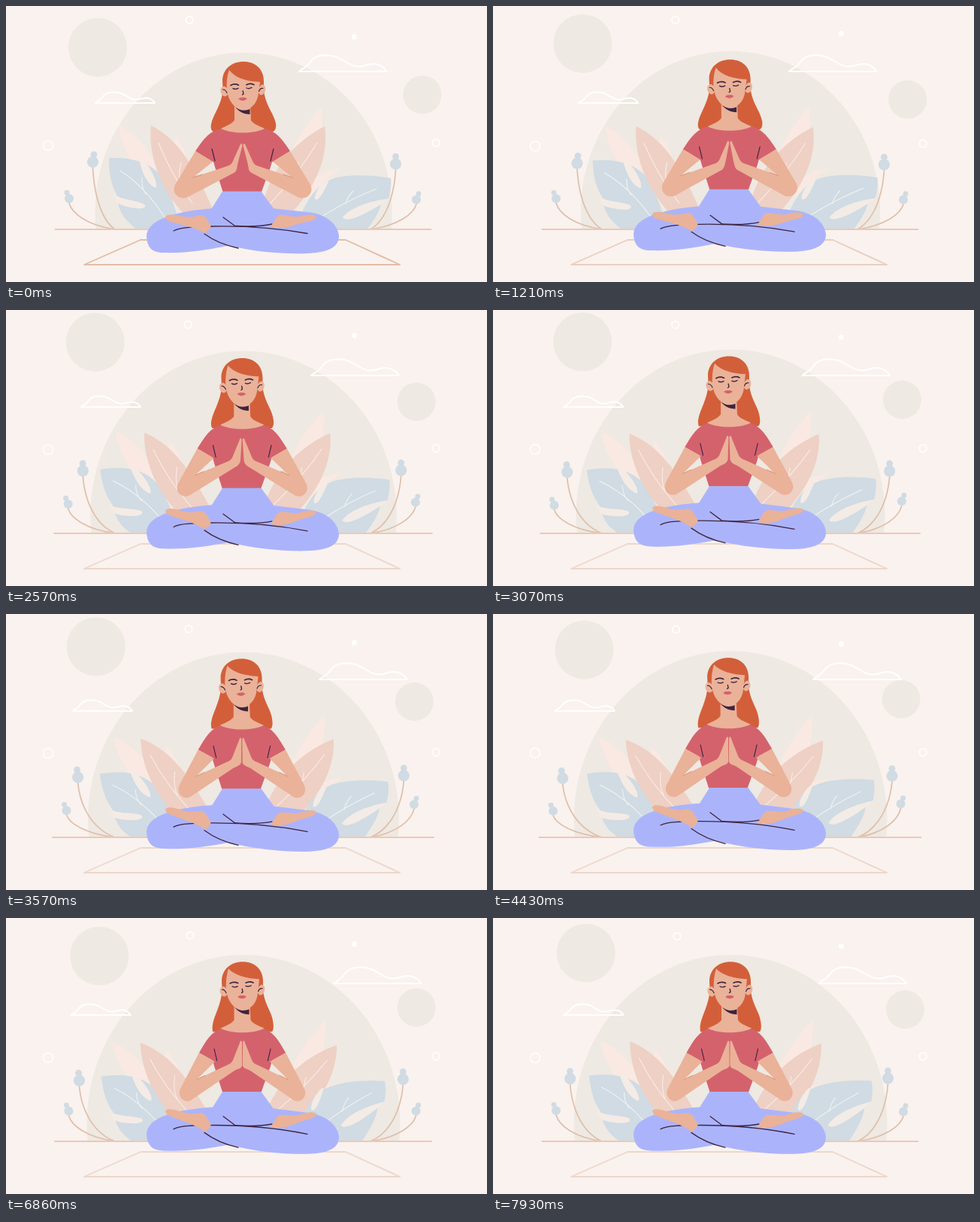
Recreate the animation shown at these times as an HTML page. Size 640 px wide and 367 px high, loop 8000 ms.

```html
<!DOCTYPE html>
<html lang="en">
<head>
<meta charset="utf-8">
<title>Meditation</title>
<style>
  html, body { margin: 0; height: 100%; overflow: hidden; background: #faf2ee; }
  svg { display: block; width: 100%; height: 100%; fill: none; stroke-linecap: round; stroke-linejoin: round; }
</style>
</head>
<body>
<svg id="stage" viewBox="0 0 640 367"></svg>
<script>
const LOOP = 8000;
const SAND = '#eee9e2', PALE = '#f9e9e2', PINK = '#eed0c4', BLUE = '#d0dbe3', STALK = '#dfbfab';
const SKIN = '#eab298', HAIR = '#d35f3a', SHIRT = '#d4626d', TROUSERS = '#abb4fb', INK = '#3f2440';
const stage = document.getElementById('stage');
let now = 0;

const ease = x => (1 - Math.cos(Math.PI * Math.min(1, Math.max(0, x)))) / 2;

// Eases from 0 to 1 in "up" ms, then back to 0 in "down" ms.
function swing(up, down = Infinity, delay = 0) {
  const t = now - delay;
  return t < up ? ease(t / up) : 1 - ease((t - up) / down);
}

// Fading oscillation; "phase" is a fraction of the period.
const bob = (period, phase = 0) =>
  (1 - now / (2 * LOOP)) * Math.sin(2 * Math.PI * (now / period + phase));

// Numbers written "a~b" run from a to b as k goes from 0 to 1.
const blend = (k, markup) => markup.replace(/(-?[\d.]+)~(-?[\d.]+)/g,
  (_, a, b) => (+a + (b - a) * k).toFixed(2));

const fill = (color, d) => `<path fill="${color}" d="${d}"/>`;
const line = (color, width, d) => `<path stroke="${color}" stroke-width="${width}" d="${d}"/>`;
const group = (transform, ...parts) => `<g transform="${transform}">${parts.join('')}</g>`;
const clipped = content => `<g clip-path="url(#above)">${content}</g>`;
const move = (x, y) => `translate(${x} ${y})`;
const turn = (angle, x, y) => `rotate(${angle} ${x} ${y})`;
// Shifts by dy at x = pivot, changing by "slope" for each unit of x.
const tilt = (dy, slope, pivot) => `matrix(1 ${slope} 0 1 0 ${dy - slope * pivot})`;
const disc = (x, y, r, color) => `<circle cx="${x}" cy="${y}" r="${r}" fill="${color}"/>`;
const oval = (x, y, rx, ry, color, angle = 0) =>
  `<ellipse cx="${x}" cy="${y}" rx="${rx}" ry="${ry}" fill="${color}" transform="${turn(angle, x, y)}"/>`;
const ring = (x, y, r, width) => `<circle cx="${x}" cy="${y}" r="${r}" stroke="#fff" stroke-width="${width}"/>`;
const mirrored = half => half + group('matrix(-1 0 0 1 630 0)', half);

const cloud = (x, y, size) => group(`${move(x, y)} scale(${size})`,
  line('#fff', 2 / size, `M0 0H116.5C112-8 102-12 92-9C82-6 75-5 65-11C53-18 48-21.5 36-21.5
    C20-21.5 17-15 12-9C9-5 4-4 0 0Z`));

function sky() {
  const grow = 1 + .055 * swing(4700);
  return disc(122 - 4 * bob(9500), 48 + 7 * bob(6000, .25), 39, SAND) +
    disc(554 - 11 * swing(4000, 8000), 118 + 7.5 * bob(6600), 25.5, SAND) +
    clipped(oval(316, 297 - 23 * grow, 197.5 * grow, 212 * grow, SAND)) +
    cloud(390 + 46 * swing(6400, 10000), 87, 1) +
    cloud(119 - 38 * swing(5100, 7000), 129, .68) +
    ring(244 - 2 * bob(9500), 18.5 + 6 * ease(now / 2 / LOOP) * 2, 4.7, 1.7) +
    ring(56, 185.5 + bob(6000), 6.5, 1.4) +
    ring(572, 182 + 2 * swing(2500), 4.8, 1.7) +
    disc(463.3, 37 + 4 * bob(4400, .25), 3.5, '#fff');
}

function leaves() {
  const slow = swing(5800, 6000);
  return [
    group(turn(-4.8 * slow, 225, 280),
      fill(PALE, 'M150 158C152 190 175 230 215 262C207 215 188 178 150 158Z')),
    group(turn(-7.8 * swing(3000, 14000), 210, 297),
      fill(BLUE, 'M137 202C165 201 200 206 215 240L240 315H195C170 292 154 286 149 262L147 250C138 235 137 215 137 202Z'),
      fill('#f5ebe5', 'M177 203C180 218 186 236 199 242C203 236 194 219 185 207Z'),
      fill('#f5ebe5', 'M143 249C152 258 168 257 183 263C189 267 182 270 174 269C164 268 152 265 147 261Z'),
      line('#edf1f2', 1.2, 'M152 219Q185 240 212 282M181 229Q180 242 186 250')),
    group(turn(-8.2 * swing(5000, 7000), 245, 280),
      fill(PALE, 'M226 172C216 195 218 230 245 270C250 230 245 200 226 172Z'),
      fill(PINK, 'M193 159C190 185 196 235 240 280L275 270C255 225 235 180 193 159Z'),
      line('#f9eae4', 1.2, 'M203 182Q220 225 248 262M233 208Q228 228 233 240')),
    group(turn(2.5 * swing(6000), 370, 260),
      fill(PALE, 'M420 133C400 155 380 185 368 225H405C416 190 424 160 420 133Z'),
      fill(PALE, 'M446 216C430 217 405 225 395 250L410 255C415 235 430 228 446 216Z')),
    group(turn(8.2 * slow, 365, 285),
      fill(PINK, 'M424 160C385 180 352 215 340 270L380 275C412 240 430 200 424 160Z'),
      line('#f9eae4', 1.2, 'M414 182Q390 222 352 262M388 222L389 208')),
    group(turn(-6.3 * swing(7500), 395, 300),
      fill(BLUE, 'M512 229C485 224 455 224 437 229C415 236 400 255 388 290V315H465C485 293 497 275 499 263L509 256C512 245 513 237 512 229Z'),
      fill('#f3ebe5', 'M511 256C485 259 458 268 448 281C451 288 470 282 500 263Z'),
      fill('#f3ebe5', 'M427 230C417 238 410 250 411 257C417 260 424 245 431 229Z'),
      line('#edf1f2', 1.2, 'M493 243Q455 258 420 280M462 246Q454 254 452 263'))
  ].join('');
}

// A stalk rooted at (rootX, 297) that arches up to a bud at (x, y).
function flower(rootX, x, y, size, lean) {
  const reach = x - rootX;
  return line(STALK, 1.7, `M${rootX} 297C${rootX + reach * .62} ${297 - (297 - y) * .14}
      ${x - reach * .06} ${y + (297 - y) * .48} ${x} ${y + size}`) +
    disc(x, y, size, BLUE) + disc(x + lean, y - size * 1.3, size * .58, BLUE);
}

function plantsAndFloor() {
  const tall = swing(4700, 7000), short = swing(2700, 3500, 1500);
  return flower(145, 115.5 - 23 * tall, 207.5 + 11 * tall, 7.6, 1.5 - 3 * tall) +
    flower(145, 84 - 4 * short, 256 + 6 * short, 6, -3) +
    flower(485, 518.5 + 12.5 * tall, 210 + 5.5 * tall, 7.6, 0) +
    flower(485, 546 - 3.5 * short, 257.5 - 5 * short, 6, 3) +
    line('#e9cab9', 1.8, `M${65.5 - 4 * short} 297H${565.5 + 4 * short}`) +
    `<g opacity="${1 - .5 * swing(2000)}">${line('#e2bea9', 1.9, 'M179 311H452L524 344H104Z')}</g>`;
}

function legs(lift) {
  const rise = swing(4700);
  return group(move(0, -15.5 * lift), fill(TROUSERS, 'M288 246.5H339.5L358 272V290H272V272Z')) +
    group(tilt(-18.5 * rise, .018 * rise, 215),
      fill(TROUSERS, `M276 269C240 272 187 280 187 307C188 322 195 328 210 328C240 329 270 324 297 318.5
        C330 327 370 330 400 329C428 328 443 321 443 306C442 290 425 276 400 274L354 269Z`),
      line(INK, 1.3, `M223 299C232 294 242 295 252 293.5M272 293C315 292 355 294 401 302.5
        M264 303C275 311 290 318 309 322M289 281L304 292M305 292.5C325 293.5 340 293 354 290`)) +
    group(tilt(-24 * rise, .11 * rise, 212),
      fill(SKIN, `M212 281C213 276 224 277 233 279.5C242 281 250 281 257 278.5C264 276 267 283 272 291
        C274 294 268 301 264 302C250 293 225 290 214 285Z`)) +
    group(tilt(-15 * rise, -.08 * rise, 353),
      fill(SKIN, `M413 281C412 276 398 277 390 280C380 281 372 277 364 278C358 280 358 287 352 292.5
        C360 297 374 295 385 291C398 286 410 287 413 281Z`));
}

// Half of the shoulders with one arm; lifting draws the elbow in and the hand up.
function shoulderAndArm(lift) {
  const squeeze = 1 - .085 * lift;
  return group(`${move(315, -20 * lift)} matrix(${squeeze} ${-.1 * lift} 0 1 0 0) ${move(-315, 0)}`,
    fill(SHIRT, 'M300 164L287 163C270 166 262 178 252 193L275 207L300 214Z'),
    blend(lift, fill(SKIN, `M252 193L226 236C219 246 228 258 240 255L303 222C308 220 307~314 214~220 309~314.6 207~216
      L314.4 186C314.4 182 312 182 311 186L302 206C300 211 297 212 294 213L249 228L275 207Z`)),
    line('#d9916f', 1, 'M249 228L261 224'),
    line(INK, 1.2, 'M274 190L278 206'));
}

function upperBody(lift, sway) {
  return group(move(-1.5 * sway, 0),
    group(move(0, -15.5 * lift),
      fill(SHIRT, 'M287 163L274 200L278 214L288.5 247H340L352 214L356 200L343 163Z')),
    mirrored(shoulderAndArm(lift)),
    group(move(0, -16.3 * lift),
      fill(SKIN, `M304 130V152C300 157 292 160 286 163C294 167 304 168.5 315 168.5
        C326 168.5 336 167 344 163C338 160 329 157 326 152L325 130Z`)));
}

const hair = lift => blend(lift, fill(HAIR, `M288 100C288 84 300 74 316 74C332 74 343 84 343 100V112
  C345 132 356 142 359~356.5 156C360~357.5 162 358~356 166 355 167H276C273~276 166 272~275 162 273~276 157
  C275~278 145 287 132 288.5 112Z`));

function face(lift) {
  return fill(INK, 'M305 134C310 139 318 140 324.5 137V144C316 144 309 140 305 134Z') +
    oval(290.5, 113.5, 5, 6.8, SKIN, -15) + oval(340.5, 111.5, 4.6, 7, SKIN, 15) +
    blend(lift, fill(SKIN, `M297 85~83C293 95 293 110 295 117C298 130 307 138 316 138C326 138 335 129 336 115
      L338 101~97C320 100~96 305 96~92 297 85~83Z`)) +
    line(INK, 1.2, 'M288.5 111Q292 111 294 115.5M342 109.5Q338 109 336.5 113.5') +
    group(move(0, -2.8 * lift),
      line(INK, 1.7, 'M299 105.5Q304 102.5 309.5 105.2M320 104.8Q325 102 330 104.7'),
      line(INK, 1.4, 'M302 109.6Q305 111.5 309 109.4M320 109Q323 110.6 327 108.4M315.2 113L316 117L314.5 118'),
      fill(SHIRT, 'M309 123.5Q313 120.5 315 121.8Q317 120.5 321 123.3Q315 128.5 309 123.5Z'));
}

function person() {
  const lift = swing(4400), sway = swing(5000, 3000);
  const head = move(-3 * sway, -15.8 * lift);
  return group(head, hair(lift)) + upperBody(lift, sway) + legs(lift) + group(head, face(lift));
}

function draw() {
  now = performance.now() % LOOP;
  stage.innerHTML = '<clipPath id="above"><path d="M0 0H640V297H0Z"/></clipPath>' +
    sky() + clipped(leaves()) + plantsAndFloor() + person();
  requestAnimationFrame(draw);
}
draw();
</script>
</body>
</html>
```
